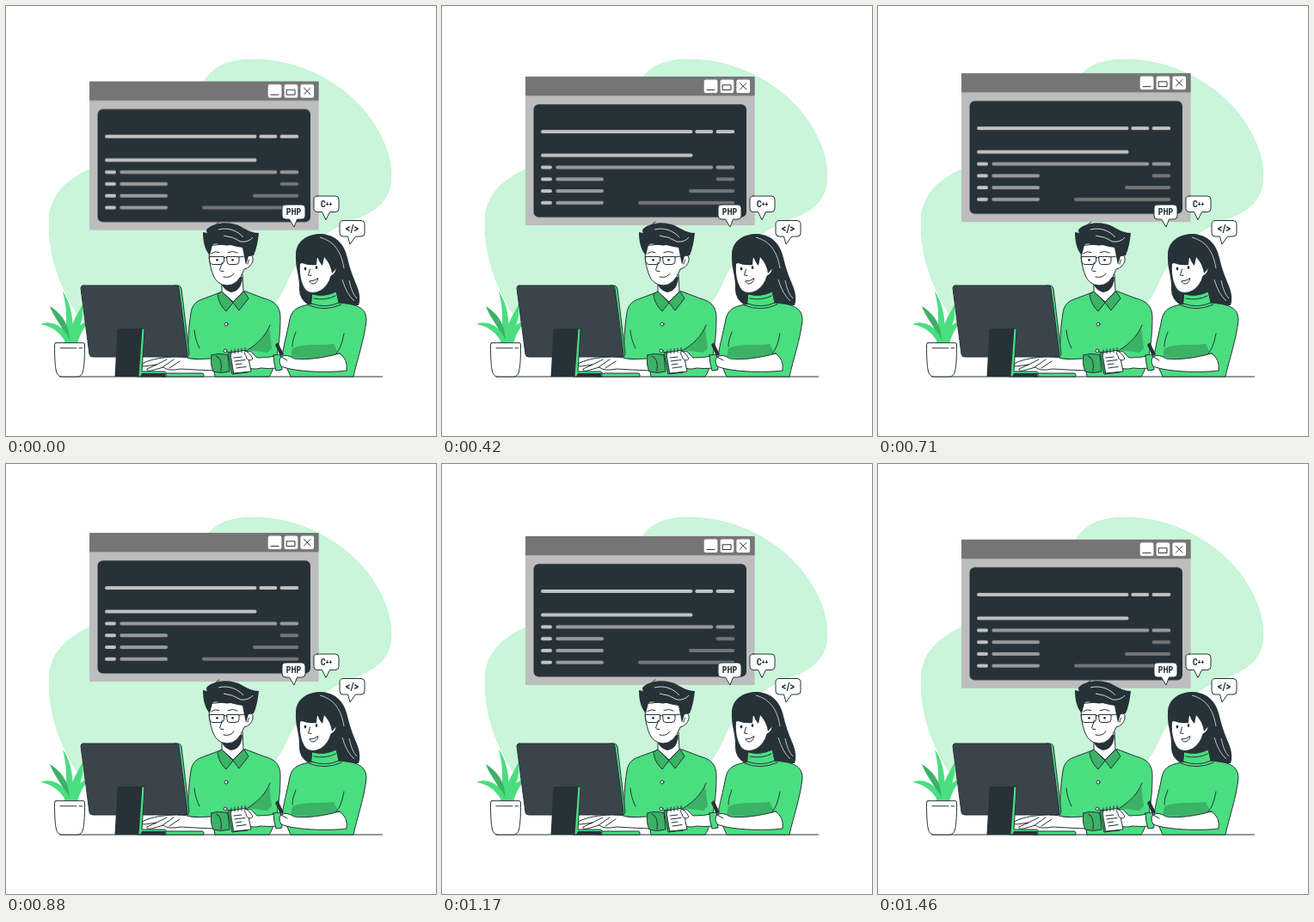
An HTML page that plays this animation: 500 by 500 pixels, repeating every 1500 ms.

```html
<!DOCTYPE html>
<html lang="en">
<head>
<meta charset="utf-8">
<title>Coding together</title>
<style>
  html, body { margin: 0; width: 100%; height: 100%; overflow: hidden; background: #fff; }
  svg { display: block; width: 100vw; height: 100vh; }
  .ink { fill: #263238; }
  .green { fill: #4ade80; }
  .shade { fill: #3bb266; }
  .white { fill: #fff; }
  .line { stroke: #263238; stroke-width: 1; stroke-linecap: round; stroke-linejoin: round; }
  .bare { fill: none; }
  .code { fill: none; stroke-width: 4; stroke-linecap: round; }
  .label { font-family: "Roboto Condensed", Roboto, sans-serif; font-weight: 700; font-stretch: 75%; text-anchor: middle; }
</style>
</head>
<body>
<svg viewBox="0 0 500 500">
  <defs>
    <path id="blob" d="M230 88C239 75 251 62 287 62C342 62 396 90 426 134C441 157 448 177 448 197C448 224 433 238 405 248C368 262 344 284 328 318C312 355 280 400 200 400C130 400 95 385 75 345C59 315 49 285 50 248C51 220 72 201 97 190C150 165 200 130 230 88Z"/>
  </defs>
  <use href="#blob" class="green"/>
  <use href="#blob" fill="#fff" opacity=".7"/>

  <g id="window">
    <path fill="#bdbdbd" d="M97 88H363.6V261H97Z"/>
    <path fill="#757575" d="M97 88H363.6V110.2H97Z"/>
    <g class="white">
      <rect x="304.7" y="91.5" width="15.7" height="15.5" rx="2"/>
      <rect x="323.6" y="91.5" width="15.7" height="15.5" rx="2"/>
      <rect x="342.4" y="91.5" width="15.7" height="15.5" rx="2"/>
    </g>
    <path class="line bare" d="M308 103.5H317M326.5 97.8H336V103.5H326.5ZM346.5 95.5L354 103M354 95.5L346.5 103"/>
    <rect class="ink" x="106.5" y="120.2" width="247.5" height="131.2" rx="6"/>
    <g id="code"></g>
  </g>

  <path class="line" d="M62.5 431H437.5"/>

  <g id="plant">
    <path class="green" d="M68 392C68 376 74 365 66 332C78 348 79 374 77 392Z"/>
    <path class="shade" d="M70 392C69 373 58 368 51 349C65 358 74 370 74 392Z"/>
    <path class="green" d="M70 392C63 380 55 373 40 370C55 364 70 374 75 392Z"/>
    <path class="green" d="M74 392C73 373 80 364 89 347C91 365 84 374 80 392Z"/>
    <path class="green" d="M76 392C78 376 87 367 101 365C91 371 87 380 83 392Z"/>
    <path class="line white" d="M58 391.7H90Q91.500 391.7 91.500 394C91.500 410 91 418 89.500 425Q88 431 83 431H65Q60 431 58.500 425C57 418 56.500 410 56.500 394Q56.500 391.7 58 391.7Z"/>
    <path class="line bare" d="M63 397.8H82M85 397.8H88.5"/>
  </g>

  <g id="woman">
    <path class="ink" d="M337 288C338 273 350 265 367 265C384 266 394 278 397 293C401 310 404 315 409 328Q413 340 410 348H352Q341 341 341 330C342 315 336 305 337 288Z"/>
    <path class="line green" d="M357 346C342 349 333 351 330 364C327 380 322 398 321 408L331 431H404C408 412 417 387 419 365C419 348 402 346 384 345Z"/>
    <path class="shade" d="M333 398C347 392 366 395 381 393L387 405C366 410 347 411 331 408Z"/>
    <path class="line bare" d="M393 381C391 392 388 400 384 404M333 396C333 388 336 383 337 379"/>
    <path class="line green" d="M356 335Q370 339 384 332L387 345Q372 352 355 346Z"/>
    <path class="line bare" d="M358 340Q372 343 383 337M352 348Q371 356 390 347"/>
    <path class="line white" d="M342 295C340 309 342 323 349 331Q356 336 366 331Q375 325 378 314Q385 310 384 303Q381 300 378 303L376 291Z"/>
    <path class="ink" d="M338 306C337 285 343 270 360 267C377 268 387 283 386 303L379 311Q378 301 370 292L368 302Q364 298 362 291L361 301Q352 302 344 299Q340 300 338 306Z"/>
    <ellipse class="ink" cx="348" cy="305.500" rx="1.3" ry="2"/>
    <ellipse class="ink" cx="361" cy="304" rx="1.3" ry="2"/>
    <path class="line bare" d="M353.500 306L351.500 313L355 313.500"/>
    <path class="line white" d="M353 320Q359 320 363 316.500Q361 324 356 323Z"/>
    <path class="bare" stroke="#fff" stroke-width=".7" d="M365 269C383 274 390 287 393 305M391 318Q396 335 405 343M399 319Q402 334 408 340"/>
  </g>

  <g id="man">
    <path class="line green" d="M252 332L228 341C219 344 216 350 215 357C212 375 212 390 211 410L240 411L243 431H306C315 417 319 389 319 362C319 349 312 343 300 340L279 332Z"/>
    <path class="shade" d="M306 373C301 385 292 394 280 400L304 403L309 398Z"/>
    <path class="line bare" d="M307 371C302 384 292 393 281 400M219 377C220 386 222 392 225 398"/>
    <path class="line white" d="M251 314V332L264 344L276 332L275 312Z"/>
    <path class="ink" d="M249 315Q250 330 262 333Q274 331 275 315Z"/>
    <path class="line shade" d="M251 332L264 345L256 355C250 349 247 343 246 336ZM277 332L282 340L271 354L264 345Z"/>
    <circle class="line white" cx="256" cy="370" r="2"/>
    <circle class="line white" cx="255" cy="401" r="2"/>

    <path class="line white" d="M237 279C235 291 237 303 241 313Q245 324 257 325Q270 325 277 306Q285 304 287 296Q288 288 281 290L277 275Z"/>
    <path class="ink" d="M237 290C231 283 229 274 229 263L234 264Q232 261 234 259C243 251 262 250 274 257C281 261 287 264 294 264C293 274 291 283 288 290L282 291L279 301L275 281Q268 280 261 278C251 280 245 274 240 278Z"/>
    <path class="line bare" d="M241 261Q242 254 248 251"/>
    <path class="bare" stroke="#fff" stroke-width=".8" d="M247 260C258 257 269 261 276 269M253 267Q264 268 273 274Q282 275 287 269"/>
    <path class="line bare" d="M236.5 291.5H253.5V297Q253 300.5 249 300.5H241Q237 300.5 236.5 296ZM257 291.5H271V297Q271 300.5 267 300.5H260Q257 300.5 257 297ZM253.5 293Q255.5 291.5 257 293M271 292L283 290M239 287.5Q243 284.5 248 286.5M258 286.5Q264 284 269 287M251.5 298L248.5 307Q249 309 253 308.5M253 315Q261 317 265 311M283 295Q281 297 281 300"/>
    <circle class="ink" cx="245.5" cy="295.3" r="1.4"/>
    <circle class="ink" cx="263.5" cy="295.3" r="1.4"/>
  </g>

  <g id="hands">
    <path class="line white" d="M242 410C229 410 219 412 211 409Q202 406 193 408C182 409 171 410 160 415Q156 419 161 419L175 417L164 422Q163 425 169 424L183 420Q188 425 203 422L221 423L242 424Z"/>
    <path class="line bare" d="M173 418L187 411M182 420L195 411M190 421L202 413"/>
    <path class="line shade" d="M239 406Q248 403 258 406L260 425Q250 428 241 425Q237 416 239 406Z"/>
    <path class="line bare" d="M244 407Q252 409 250 425"/>
    <path class="line white" d="M278 404Q284 399 287 404L292 409Q304 409 314 407L317 421Q304 422 296 421Q286 424 280 419Z"/>
    <path class="line shade" d="M258 403L263 428L281 426L277 402Z"/>
    <path class="line white" d="M261 403L280 400L285 425L265 427Z"/>
    <path class="line bare" d="M265 409L274 408M266 413L278 411.5M267 417L274 416M268 421L279 419.5M262 405V400M266 404V399M270 403.5V398.5M274 403V398M278 402V397.5"/>
    <path class="line white" d="M279 407Q276 403 279 401Q285 405 287 410Q284 414 280 410Z"/>
    <path class="line green" d="M311 406L319 405L321 423L314 424Q311 415 311 406Z"/>
    <path class="ink" d="M313 394L316 391L323 405L319 407Z"/>
    <path class="line white" d="M388 404C370 409 350 412 335 410Q326 404 320 408Q316 412 320 419C334 425 372 427 396 424Q398 411 388 404Z"/>
    <path class="line bare" d="M320 408L327 412"/>
  </g>

  <g id="monitor">
    <path class="line green" d="M196 325H200Q203 325 204 329L213 404Q213 408 209 408H200Z"/>
    <path class="line" fill="#3c444b" d="M90 325H198Q200.5 325 201 328L211 404Q211 408 208 408H101Q97.5 408 97 405L87 328Q87 325 90 325Z"/>
    <path class="line green" d="M180 427H228Q230 427 230 429V431H180Z"/>
    <path class="line green" d="M156 375H160Q161 375 161 377L158 425H184Q186 425 186 427V431H153Z"/>
    <path class="ink" d="M158 427H185V431H156Z"/>
    <path class="ink" d="M132 375H158.5L154.5 431H126.5L129.5 377Q129.5 375 132 375Z"/>
  </g>

  <g id="bubbles"></g>
</svg>
<script>
  const NS = "http://www.w3.org/2000/svg";
  const byId = id => document.getElementById(id);

  function add(parent, tag, attrs, text = "") {
    const el = document.createElementNS(NS, tag);
    for (const key in attrs) el.setAttribute(key, attrs[key]);
    el.textContent = text;
    return parent.appendChild(el);
  }

  // Bars of code by colour: left edge, right edge and height of each.
  const bars = {
    "#c2c2c2": [[115, 291.5, 151.9], [294.3, 315.3, 151.9], [318.5, 340.3, 151.9], [115, 291.5, 179.6],
                ...[193.4, 207.2, 221, 234.8].map(y => [115, 128, y])],
    "#9a9a9a": [[132.3, 315.3, 193.4], [318.5, 340.3, 193.4],
                ...[207.2, 221, 234.8].map(y => [132.3, 188, y])],
    "#757575": [[318.5, 340.3, 207.2], [287, 340.3, 221], [228, 340.3, 234.8]]
  };
  for (const [stroke, rows] of Object.entries(bars)) {
    const d = rows.map(([left, right, y]) => `M${left + 2} ${y}H${right - 2}`).join("");
    add(byId("code"), "path", { class: "code", stroke, d });
  }

  function bubble(x, y, w, h, tip, size, text, small = "") {
    const mid = x + w / 2;
    const d = `M${x + 4} ${y}h${w - 8}q4 0 4 4v${h - 8}q0 4 -4 4H${mid + 4}` +
      `L${tip} ${y + h + 9}L${mid - 5} ${y + h}H${x + 4}q-4 0 -4 -4v${8 - h}q0 -4 4 -4Z`;
    add(byId("bubbles"), "path", { class: "line white", d });
    const label = add(byId("bubbles"), "text",
      { class: "ink label", x: mid, y: y + h / 2 + size * 0.36, "font-size": size }, text);
    if (small) add(label, "tspan", { "font-size": size * 0.75, dy: -0.6 }, small);
  }
  bubble(321, 231, 27, 17, 335, 10, "PHP");
  bubble(358, 221, 29, 18.5, 372, 10.5, "C", "++");
  bubble(388, 249.5, 29, 18.5, 400, 12.5, "</>");

  // The window floats up and back at an even speed, 24 steps a second.
  const shift = (y, offset) => ({ transform: `translateY(${y}px)`, offset });
  byId("window").animate(
    [shift(-0.37, 0), shift(-10, 0.4815), shift(0, 0.9815), shift(-0.37, 1)],
    { duration: 1500, iterations: Infinity, delay: -4, easing: "steps(36)" }
  );
</script>
</body>
</html>
```
